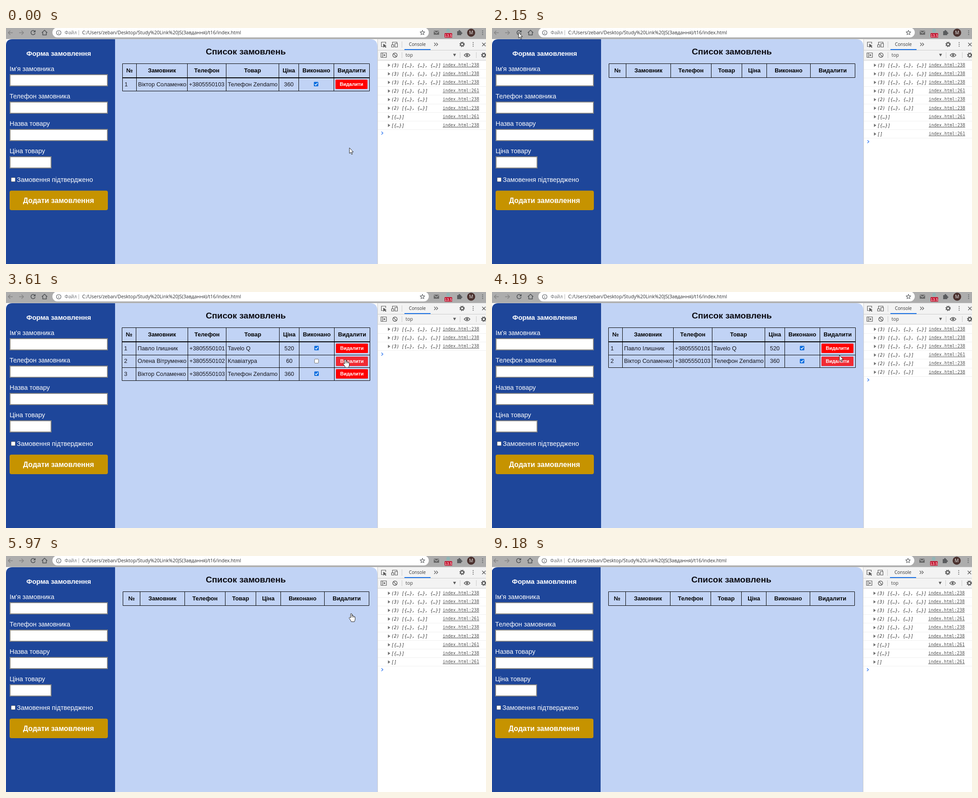
Write an HTML page that moves like this. It is 1065 by 526 pixels and loops after 9960 ms.

```html
<!DOCTYPE html>
<html lang="uk">
<head>
<meta charset="utf-8">
<title>Список замовлень</title>
<style>
html, body { margin: 0; width: 100%; height: 100%; overflow: hidden; background: #fff; }
svg { display: block; width: 1065px; height: 526px; }
text { font-family: "Liberation Sans", Arial, sans-serif; white-space: pre; }
.ui { font-family: "Open Sans", "Noto Sans", sans-serif; }
.mono { font-family: "DejaVu Sans Mono", monospace; }
.i { font-style: italic; }
.u { text-decoration: underline; }
.b { font-weight: bold; }
.m { text-anchor: middle; }
</style>
</head>
<body>
<svg id="stage" viewBox="0 0 1065 526"></svg>
<script>
const LOOP = 9960;
const stage = document.getElementById('stage');

// Drawing helpers, all returning SVG markup
const rect = (x, y, w, h, fill, more = '') =>
  `<rect x="${x}" y="${y}" width="${w}" height="${h}" fill="${fill}" ${more}/>`;
const circle = (x, y, r, fill, more = '') =>
  `<circle cx="${x}" cy="${y}" r="${r}" fill="${fill}" ${more}/>`;
const ring = (x, y, r, color, width, more = '') =>
  circle(x, y, r, 'none', `stroke="${color}" stroke-width="${width}" ${more}`);
const line = (d, color, width = 1) =>
  `<path d="${d}" fill="none" stroke="${color}" stroke-width="${width}"/>`;
const shape = (d, fill) => `<path d="${d}" fill="${fill}"/>`;
const text = (x, y, s, size, fill, cls = '') =>
  `<text x="${x}" y="${y}" font-size="${size}" fill="${fill}" class="${cls}">${s}</text>`;
const dots = (x, y, color) => [-4, 0, 4].map(d => circle(x, y + d, 1.1, color)).join('');
const gear = (x, y, color) => ring(x, y, 3.4, color, 2.2) + ring(x, y, 5, color, 1.9, 'stroke-dasharray="2 1.927"');

function checkbox(x, y, on) {
  return on
    ? rect(x, y, 10, 10, '#0f6fdf', 'rx="1.5"') + line(`M${x + 2} ${y + 5.2}l2.2 2.2 4-4.8`, '#fff', 1.5)
    : rect(x + .5, y + .5, 9, 9, '#fff', 'rx="1.5" stroke="#767676"');
}

function star(x, y, r) {
  const points = Array.from({ length: 10 }, (_, i) => {
    const a = Math.PI * i / 5, d = i % 2 ? r / 2 : r;
    return `${x + d * Math.sin(a)} ${y - d * Math.cos(a)}`;
  });
  return line(`M${points.join('L')}Z`, '#55585b', 1.1);
}

function browserBar(reloadHover) {
  const dark = '#4c4f52', pale = '#858585';
  return rect(0, 0, 1070, 24, '#adadad') + rect(0, 24, 1070, 1, '#c4c4c4') +
    (reloadHover ? circle(60, 10, 11, '#9b9b9b') : '') +
    line('M15 10.5H5m4.5-4.5L5 10.5l4.5 4.5', pale, 1.4) +
    line('M29 10.5H39m-4.5-4.5l4.5 4.5-4.5 4.5', pale, 1.4) +
    line('M64 7.5A4.7 4.7 0 1 0 64.7 11.5', dark, 1.5) + shape('M65.5 4.5v5h-5Z', dark) +
    line('M79.5 10.5l6-5.5 6 5.5m-10-1v6h8v-6', dark, 1.5) +
    rect(103, -1, 835, 22, '#fff', 'rx="11"') +
    ring(117, 10.5, 5, '#5f6368', 1.2) + line('M117 9.7v3.8m0-6.2v1.3', '#5f6368', 1.2) +
    text(130, 14.3, 'Файл', 10.55, '#6a6d71', 'ui') + line('M161.5 5V16', '#b5b5b5') +
    text(169, 14.3, 'C:/Users/zeban/Desktop/Study%20Link%20JS(Завдання)/t16/index.html', 10.55, '#303134', 'ui') +
    star(924, 10.5, 5.2) +
    rect(949, 6, 12, 9, '#686868', 'rx="1"') + line('M949.5 7l5.5 4.5 5.5-4.5', '#bbb', 1.2) +
    circle(981, 6, 4, '#8fb5b5') +
    rect(973, 11.5, 17, 10, '#c3112d', 'rx="1.5"') + text(981.5, 19.7, '13.5', 8.6, '#fff', 'm') +
    rect(1001, 7, 9, 9, '#5a5c5e') + circle(1006, 6.5, 2, '#5a5c5e') + circle(1010.5, 11.5, 2, '#5a5c5e') +
    circle(1032, 10.5, 9, '#4a302d') + text(1032, 14, 'M', 10, '#eee', 'ui m') +
    dots(1057.5, 10.5, '#55585b');
}

function orderForm() {
  const labels = ['Ім\'я замовника', 'Телефон замовника', 'Назва товару', 'Ціна товару'];
  return shape('M-2 526V39H0Q0 25 14 25H242V526Z', '#1e469a') +
    text(117, 62, 'Форма замовлення', 14.98, '#fff', 'b m') +
    labels.map((label, i) => {
      const y = 103 + 61 * i;
      return text(8, y - 7, label, 14.4, '#fff') +
        rect(9, y + 1, i < 3 ? 216 : 91, 25, '#fff', 'stroke="#858585" stroke-width="2"');
    }).join('') +
    checkbox(11, 333, false) + text(24, 343, 'Замовення підтверджено', 14.4, '#fff') +
    rect(8, 362.5, 218, 43.5, '#c69300', 'rx="4"') +
    text(116.5, 389.7, 'Додати замовлення', 16, '#fff', 'b m');
}

const HEADS = ['№', 'Замовник', 'Телефон', 'Товар', 'Ціна', 'Виконано', 'Видалити'];
const ORDERS = [
  ['Павло Ілишник', '+3805550101', 'Tavelo Q', 520, true],
  ['Олена Вітруменко', '+3805550102', 'Клавіатура', 60, false],
  ['Віктор Соламенко', '+3805550103', 'Телефон Zendamo', 360, true]
];
const PITCH = 28.7;
const pen = document.createElement('canvas').getContext('2d');

function measure(s, weight) {
  pen.font = weight + ' 12.8px "Liberation Sans", Arial, sans-serif';
  return pen.measureText(s).width;
}

// Column edges: each column fits its widest text, a small table grows to the minimum width
function columns(rows) {
  const widths = HEADS.map((head, i) => Math.max(
    measure(head, 'bold') + 16.4,
    ...(i > 0 && i < 5 ? rows.map(id => measure(ORDERS[id][i - 1], 'normal') + 6.6) : [])
  ));
  const sum = widths.reduce((a, b) => a + b);
  const total = Math.max(sum, 546);
  let x = 532 - total / 2;
  return [0, ...widths].map(w => Math.round(x += w * total / sum) + .5);
}

function orderTable(rows, cur) {
  const c = columns(rows);
  const mid = i => (c[i] + c[i + 1]) / 2;
  const edge = i => Math.round(110.8 + PITCH * i) + .5;
  const bottom = rows.length ? edge(rows.length) : 110.5;
  let out = shape('M242 25H808Q824 25 824 41V526H242Z', '#c1d3f5') +
    text(532, 59, 'Список замовлень', 19.2, '#0b0b12', 'b m') +
    line(`M${c[0]} 79.5H${c[7]}V${bottom}H${c[0]}Z` + c.slice(1, 7).map(x => `M${x} 79.5V${bottom}`).join(''), '#000') +
    HEADS.map((head, i) => text(mid(i), 99.4, head, 12.8, '#000', 'b m')).join('');
  rows.forEach((id, i) => {
    const [name, phone, item, price, done] = ORDERS[id];
    const y = 129.5 + PITCH * i, top = Math.round(114.8 + PITCH * i), bx = c[6] + 3.5;
    const over = cur.x > bx && cur.x < bx + 71 && cur.y > top - 5 && cur.y < top + 22;
    out += line(`M${c[0] - .5} ${i ? edge(i) : 111}H${c[7] + .5}`, '#000', i ? 1 : 1.8) +
      [i + 1, name, phone, item].map((s, k) => text(c[k] + (k ? 3.5 : 4.5), y, s, 12.8, '#15151c')).join('') +
      text(mid(4), y, price, 12.8, '#15151c', 'm') +
      checkbox(Math.round(mid(5) - 5.5), top + 5, done) +
      rect(bx, top, 71, 21, over ? '#f12a33' : '#f00', 'rx="1.5"') +
      text(bx + 35.5, top + 14.4, 'Видалити', 10.67, '#fff', 'b m');
  });
  return out;
}

// One entry per deletion, then one per row drawn again
const LOGS = [3, 2, 1, 0].flatMap(n => [...(n < 3 ? [[n, 261]] : []), ...Array(n).fill([n, 238])]);

function devtools(rowCount) {
  const g = '#5a5a5a', logs = LOGS.filter(([n]) => n >= rowCount);
  const lineY = i => 83 + 19.15 * i;
  return rect(824, 25, 246, 501, '#fff') + rect(824, 25, 246, 47, '#f3f3f3') +
    line('M824 49.5h246M824 72h246M824.5 25V526M878.5 30v14M878.5 54v13M1007.5 54v13M1043.5 54v13', '#cbcbcb') +
    line('M842.5 35.5v-4H833v10h3.5', g, 1.2) + shape('M837 35v9l2.5-2.5 3 2.5 1.5-1.5-2.5-2.5h3Z', g) +
    line('M857.5 37v-5.5h10V34M855.5 37.5h5v5h-5ZM863 34.5h5.5v8H863Z', g, 1.2) +
    text(894, 40.3, 'Console', 10, '#333', 'ui') + rect(884, 47, 58, 2, '#1a73e8') +
    line('M950 33l3.5 3.5L950 40m4.5-7l3.5 3.5-3.5 3.5', g, 1.3) +
    gear(1012, 36.5, g) + dots(1036.5, 36.5, g) + line('M1056.5 33l7.5 7.5m0-7.5l-7.5 7.5', g, 1.4) +
    line('M832 55.5h12v10h-12Zm3.5 0v10', g, 1.2) + shape('M838 58l4 2.5-4 2.5Z', g) +
    ring(863, 60.5, 4.8, g, 1.4) + line('M859.7 57.2l6.6 6.6', g, 1.4) +
    text(886.5, 64, 'top', 10.4, '#444', 'ui') + shape('M992 57.5h6.5l-3.3 6Z', g) +
    line('M1016.5 60.5q6.5-7.500 13 0-6.5 7.500-13 0Z', g, 1.3) + circle(1023, 60.5, 2.3, g) +
    gear(1060, 60.5, g) +
    logs.map(([n, source], i) => {
      const y = lineY(i), list = (n > 1 ? `(${n}) ` : '') + '[' + Array(n).fill('{…}').join(', ') + ']';
      return line(`M825 ${Math.round(y + 9) + .5}h245`, '#f0f0f0') +
        shape(`M847.5 ${y - 3.7}l5 3.7-5 3.7Z`, '#6e6e6e') +
        text(855, y + 3.6, list, 9.6, '#303030', 'mono i') +
        text(969, y + 2.8, 'index.html:' + source, 9.6, '#545454', 'mono u');
    }).join('') +
    line(`M833 ${lineY(logs.length) - 5.2}l3.3 3.2-3.3 3.2`, '#367cf1', 1.4);
}

// Pointer trips: start, end, x, y; each slows down as it arrives
const START = { x: 762, y: 267 };
const TRIPS = [
  [120, 700, 768, 127], [850, 1140, 785, 133], [1200, 2150, 59, 10], [2600, 3000, 753, 150],
  [3750, 3900, 764, 246], [3900, 4365, 772, 124], [4900, 5050, 770, 286], [5050, 5510, 766, 128],
  [5990, 6860, 960, 515], [7010, 7410, 1055, 466]
];

function pointer(t) {
  let { x, y } = START;
  for (const [start, end, tx, ty] of TRIPS) {
    const left = 1 - Math.min(1, Math.max(0, (t - start) / (end - start)));
    x = tx + (x - tx) * left * left;
    y = ty + (y - ty) * left * left;
  }
  return { x, y };
}

const ARROW = 'M0 0v12.5l2.8-2.5 2 4.7 2-.8-2-4.6h3.9Z';
const HAND = 'M-1.4 1Q0-.8 1.4 1v5Q3-.2 4 6.200 5.500 5.300 6.300 7 8.500 6.300 8.700 9v4Q8.500 15 7 18.500H0Q-1 15-4.200 11.500C-5.500 9-3.500 7.800-1.400 10Z';

function cursor({ x, y }) {
  const hand = x > 731 && x < 802 && y > 115 && y < 166 && (y - 115) % PITCH < 21;
  return `<g transform="translate(${x.toFixed(1)} ${y.toFixed(1)})">
    <path d="${hand ? HAND : ARROW}" fill="#fff" stroke="#111" stroke-width=".9" stroke-linejoin="round"/>
    ${hand ? line('M1.4 6v3m2.600-2.500v2.500m2.300-1.700v2', '#111', .8) : ''}</g>`;
}

// Time and visible orders
const STATES = [[0, [2]], [840, []], [2590, [0, 1, 2]], [3750, [0, 2]], [4900, [2]], [5820, []]];

function scene(t) {
  const [, rows] = STATES.filter(s => s[0] <= t).pop();
  const cur = pointer(t);
  const visible = t < 7010 || (t >= 7410 && t < 7570);
  return `<g transform="translate(${t < 7010 ? 0 : -1} 0)">` +
    browserBar(t >= 2450 && t < 2700) + orderForm() +
    orderTable(rows, cur) + devtools(rows.length) + '</g>' + (visible ? cursor(cur) : '');
}

let shown = '';
function frame(now) {
  const next = scene(now % LOOP);
  if (next !== shown) stage.innerHTML = shown = next;
  requestAnimationFrame(frame);
}
frame(0);
</script>
</body>
</html>
```
